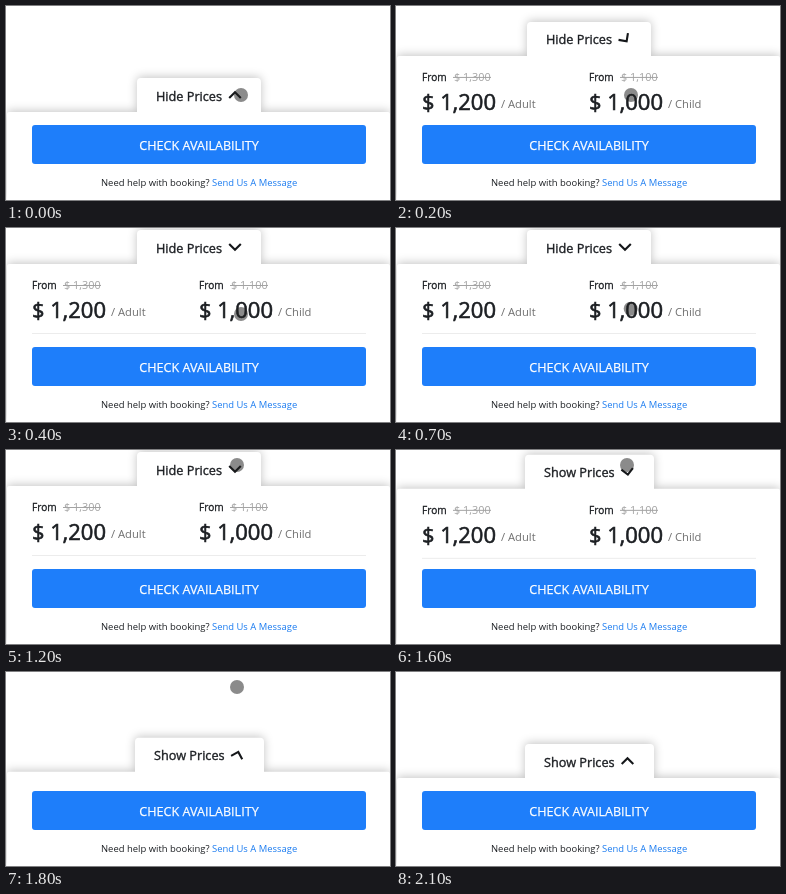
An HTML page for the animation above (2.4 s loop, 384 px wide and 194 px high).

```html
<!DOCTYPE html>
<html lang="en">
<head>
<meta charset="utf-8">
<title>Price panel</title>
<style>
  html, body { margin: 0; width: 100%; height: 100%; overflow: hidden; background: #fff; }
  svg { display: block; width: 384px; height: 194px; }
  text { font-family: "Open Sans", "Noto Sans", sans-serif; fill: #1c1f23; stroke: #1c1f23; stroke-width: 0; white-space: pre; }
  #shell { fill: #fff; filter: drop-shadow(0 -1px 5px rgba(0, 0, 0, .24)); }
  /* thin strokes give a medium weight */
  #label { font-size: 12.7px; stroke-width: .35px; }
  #chevron { fill: none; stroke: #15171a; stroke-width: 2.1; }
  .from { font-size: 10.1px; stroke-width: .3px; }
  .old { font-size: 10.9px; fill: #a3a3a3; }
  .price { font-size: 22px; stroke-width: .6px; }
  .unit { font-size: 11.2px; fill: #707070; }
  .strike { stroke: #a3a3a3; }
  .cta { font-size: 12.6px; fill: #fff; stroke: #fff; stroke-width: .25px; text-anchor: middle; }
  .help { font-size: 9.45px; }
  .link { fill: #1a7bf0; }
</style>
</head>
<body>
<svg viewBox="0 0 384 194">
  <defs>
    <clipPath id="body"><rect width="384" height="112"/></clipPath>
  </defs>
  <path id="shell"/>
  <text id="label" y="0"></text>
  <path id="chevron" d="M-5.8 3 L0 -2.8 L5.8 3"/>
  <g clip-path="url(#body)">
    <g id="prices">
      <path d="M26 105.5H360" stroke="#ececec"/>
    </g>
  </g>
  <rect x="26" y="119" width="334" height="39" rx="3" fill="#1e7efa"/>
  <text class="cta" x="193" y="144">CHECK AVAILABILITY</text>
  <text class="help" x="95" y="180">Need help with booking?</text>
  <text class="help link" x="206" y="180">Send Us A Message</text>
  <circle id="pointer" r="7" fill="#202020" fill-opacity=".52"/>
</svg>
<script>
  const LOOP = 2400, STEP = 100;
  const OPEN_TOP = 36, CLOSED_TOP = 106;
  const OPEN_AT = 28, CLOSE_AT = 1580, SLIDE = 345;
  const $ = id => document.getElementById(id);
  const clamp = v => Math.min(1, Math.max(0, v));
  const smooth = v => v * v * (3 - 2 * v);

  // cubic-bezier(.25, .1, .25, 1)
  const curve = (a, b, s) => 3 * a * s * (1 - s) ** 2 + 3 * b * s * s * (1 - s) + s ** 3;
  function ease(x) {
    let lo = 0, hi = 1;
    for (let i = 0; i < 24; i++) {
      const mid = (lo + hi) / 2;
      if (curve(.25, .25, mid) < x) lo = mid; else hi = mid;
    }
    return curve(.1, 1, lo);
  }

  function priceBlock(x, old, price, unit, unitX) {
    return `<text class="from" x="${x}" y="61">From</text>
      <text class="old" x="${x + 32}" y="61">${old}</text>
      <path class="strike" d="M${x + 31} 57.5h38"/>
      <text class="price" x="${x}" y="90">${price}</text>
      <text class="unit" x="${unitX}" y="88">${unit}</text>`;
  }
  $("prices").insertAdjacentHTML("beforeend",
    priceBlock(26, "$ 1,300", "$ 1,200", "/ Adult", 105) +
    priceBlock(193, "$ 1,100", "$ 1,000", "/ Child", 272));

  function shellPath(top, left, right) {
    const y = top - 34;
    return `M1 194V${top + 2}q0 -2 2 -2H${left}V${y + 4}q0 -4 4 -4H${right - 4}q4 0 4 4
      V${top}H382q2 0 2 2V194Z`;
  }

  function pointerAt(t) {
    const drift = clamp((t - 300) / 100), rise = smooth(clamp((t - 600) / 600));
    return [235 - 4 * rise, 89 - 3 * drift - 71 * rise];
  }

  function draw(t) {
    const open = ease(clamp((t - OPEN_AT) / SLIDE)) - ease(clamp((t - CLOSE_AT) / SLIDE));
    const top = CLOSED_TOP + (OPEN_TOP - CLOSED_TOP) * open;
    const hiding = t < 1500;
    $("shell").setAttribute("d", hiding ? shellPath(top, 131, 255) : shellPath(top, 129, 258));
    $("label").textContent = hiding ? "Hide Prices" : "Show Prices";
    $("label").setAttribute("transform", `translate(${hiding ? 150 : 148} ${top - 11.5})`);
    $("chevron").setAttribute("transform",
      `translate(${hiding ? 229 : 231.5} ${top - 17}) rotate(${180 * open})`);
    $("prices").setAttribute("transform", `translate(0 ${top - OPEN_TOP})`);
    const [x, y] = pointerAt(t);
    $("pointer").setAttribute("transform", `translate(${x} ${y})`);
    $("pointer").style.display = t < 1900 ? "" : "none";
  }

  const start = performance.now();
  function tick() {
    const t = (performance.now() - start) % LOOP;
    draw(Math.floor(t / STEP) * STEP);
    requestAnimationFrame(tick);
  }
  tick();
</script>
</body>
</html>
```
